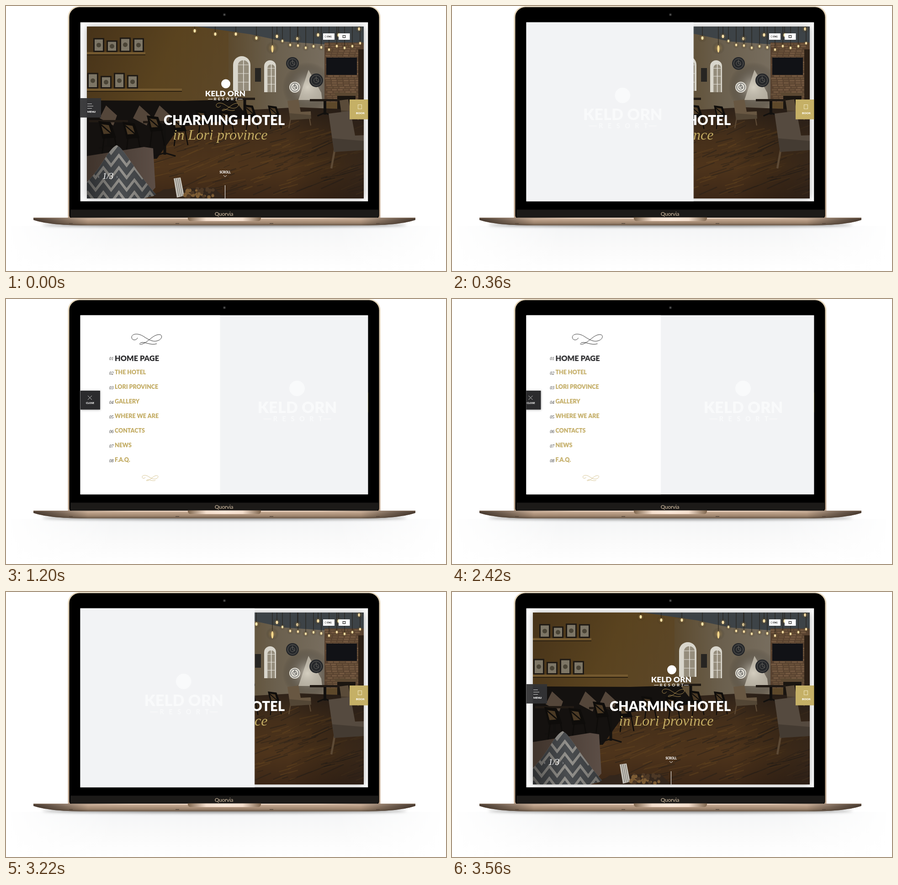
An HTML page with a canvas for the animation above (3.6 s loop, 963x581 px).

```html
<!DOCTYPE html>
<html lang="en">
<head>
<meta charset="utf-8">
<title>Resort menu</title>
<style>
html, body { margin: 0; width: 100%; height: 100%; overflow: hidden; background: #fff; }
canvas { display: block; width: 963px; height: 581px; }
</style>
</head>
<body>
<canvas id="stage" width="963" height="581"></canvas>
<script>
const W = 963, H = 581, LOOP = 3600;
const SCREEN = { x: 162.5, y: 35.5, w: 630, h: 393 };
const PHOTO = { x: 177, y: 45, w: 606, h: 377 };
const MENU_W = 306;
const SANS = 'Lato, sans-serif', SERIF = '"Liberation Serif", serif';
const GOLD = '#c2ab62', PALE = '#f2f3f5', DARK = '#2b2b2d', CLEAR = '#0000';
const stage = document.getElementById('stage').getContext('2d');
let c;

function layer(draw) {
  const el = document.createElement('canvas');
  el.width = W; el.height = H;
  c = el.getContext('2d');
  draw();
  return el;
}
function rect(color, x, y, w, h) { c.fillStyle = color; c.fillRect(x, y, w, h); }
function fill(color, box) { rect(color, box.x, box.y, box.w, box.h); }
function round(color, x, y, w, h, radii) {
  c.fillStyle = color;
  c.beginPath(); c.roundRect(x, y, w, h, radii); c.fill();
}
function poly(color, ...p) {
  c.fillStyle = color;
  c.beginPath();
  for (let i = 0; i < p.length; i += 2) c.lineTo(p[i], p[i + 1]);
  c.fill();
}
function line(color, width, ...p) {
  c.strokeStyle = color; c.lineWidth = width;
  c.beginPath();
  for (let i = 0; i < p.length; i += 2) c.lineTo(p[i], p[i + 1]);
  c.stroke();
}
function disc(color, x, y, r, ry = r) {
  c.fillStyle = color;
  c.beginPath(); c.ellipse(x, y, r, ry, 0, 0, 7); c.fill();
}
function ring(color, width, x, y, r) {
  c.strokeStyle = color; c.lineWidth = width;
  c.beginPath(); c.arc(x, y, r, 0, 7); c.stroke();
}
function fade(x0, y0, x1, y1, ...colors) {
  const g = c.createLinearGradient(x0, y0, x1, y1);
  colors.forEach((k, i) => g.addColorStop(i / (colors.length - 1), k));
  return g;
}
function glow(x, y, r, color) {
  const g = c.createRadialGradient(x, y, 0, x, y, r);
  g.addColorStop(0, color); g.addColorStop(1, CLEAR);
  rect(g, x - r, y - r, 2 * r, 2 * r);
}
function text(str, x, y, font, color, align = 'left', gap = 0) {
  c.font = font; c.fillStyle = color; c.textAlign = align;
  c.letterSpacing = gap + 'px';
  c.fillText(str, x, y);
}
function at(x, y, scale, draw) {
  c.save();
  c.translate(x, y); c.scale(scale, scale);
  draw();
  c.restore();
}
function clipTo(box, draw) {
  c.save();
  c.beginPath(); c.rect(box.x, box.y, box.w, box.h); c.clip();
  draw();
  c.restore();
}
function flourish(x, y, scale, color, width) {
  at(x, y, scale, () => {
    c.strokeStyle = color; c.lineWidth = width / scale;
    c.stroke(new Path2D('M13 9C10 16 0 15 0 8C0 0 14-2 26 6C38 14 46 18 55 16C68 13 69 1 59 2C47 3 39 15 27 21C18 26 15 23 20 20C27 16 42 27 55 22'));
  });
}
const bold = size => `900 ${size}px ${SANS}`;
const italic = size => `italic ${size}px ${SERIF}`;

function seeded(seed) {
  const next = () => (seed = (seed * 16807) % 2147483647) / 2147483647;
  return (lo = 0, hi = 1) => lo + next() * (hi - lo);
}

function laptop() {
  rect('#fff', 0, 0, W, H);
  rect(fade(0, 482, 0, H, '#f4f5f6', '#fafafa', '#fff'), 10, 482, 940, 99);
  rect(fade(0, 0, W, 0, '#fff', '#fff0', '#fff0', '#fff0', '#fff'), 0, 460, W, 121);
  c.filter = 'blur(3px)';
  disc('#444a', 478, 480, 398, 4);
  c.filter = 'none';

  round(fade(0, 0, 0, 465, '#e4d5ba', '#c9b59b', '#bfa68e'), 135.5, 0.5, 684, 470, [24, 24, 8, 8]);
  round('#000', 138.5, 2.5, 678, 463, [22, 22, 6, 6]);
  round('#1c1a18', 141, 446.5, 674, 18, [0, 0, 5, 5]);
  disc('#2b2b2b', 478, 19, 3);
  disc('#666', 478, 19, 1.2);
  text('Quorvia', 477, 459.5, `12px ${SANS}`, '#d8c3a8', 'center', -0.3);

  const base = new Path2D('M60 464H896V469C876 476 840 481 780 481H176C116 481 80 476 60 469Z');
  c.fillStyle = fade(0, 464, 0, 481, '#d9bea8', '#b89d86', '#a0866f', '#695848');
  c.fill(base);
  c.fillStyle = fade(60, 0, 896, 0, '#2a1f18cc', CLEAR, CLEAR, CLEAR, CLEAR, CLEAR, CLEAR, '#2a1f18cc');
  c.fill(base);
  rect(fade(60, 0, 896, 0, '#6d5948', '#e5cdb8', '#f4dfcf', '#e5cdb8', '#6d5948'), 60, 464, 836, 2);
  round(fade(398, 0, 558, 0, '#80674f', '#f5dfcd', '#fbe7d8', '#f5dfcd', '#80674f'), 398, 463.5, 160, 8, [0, 0, 6, 6]);
  for (const x of [142, 375, 581, 814]) rect('#59493c', x - 4, 476, 8, 1.5);
}

// Parts of the room
function arch(x, y, w, h) {
  round('#d9d6cc', x, y, w, h, [w / 2, w / 2, 0, 0]);
  round('#958d7c', x + w * .28, y + 9, w * .62, h - 9, [w * .3, w * .3, 0, 0]);
  line('#e5e2da', 1.5, x + w * .6, y + 8, x + w * .6, y + h);
  for (let k = 1; k < 4; k++) line('#e5e2da', 1, x + w * .28, y + h * k / 4, x + w * .9, y + h * k / 4);
}
function clock(x, y, r, face, mark) {
  disc(face, x, y, r);
  ring(mark, 1, x, y, r * .75);
  ring(mark, 1, x, y, r * .35);
  line(mark, 1, x, y - r * .6, x, y, x + r * .4, y + r * .2);
}
function shelf(x, y, length, rnd) {
  rect('#74592f', 177, y, length, 5);
  rect('#2a1f10', 177, y + 5, length, 2);
  for (; x < 285; x += 29) {
    const h = rnd(24, 36);
    rect('#1e1914', x, y - h, 24, h);
    rect('#7d7666', x + 3, y - h + 3, 18, h - 6);
    disc('#4a4436', x + 12, y - h / 2, 5);
  }
}
function darkChair(x, y, scale) {
  at(x, y, scale, () => {
    poly('#0e0c0a', 0, 0, 24, 3, 34, 32, 8, 34);
    poly('#4b3a25', 5, 6, 20, 8, 25, 24, 10, 25);
    line('#0e0c0a', 2.5, 5, 7, 26, 25);
    line('#0e0c0a', 2.5, 11, 32, 7, 65);
    line('#0e0c0a', 2.5, 31, 31, 37, 63);
  });
}
function armchair(x, y, scale, color) {
  at(x, y, scale, () => {
    line('#5d4a35', 2.2, 7, 38, 3, 60);
    line('#5d4a35', 2.2, 48, 37, 51, 54);
    poly(color, 0, 0, 24, -3, 29, 24, 51, 23, 52, 39, 6, 42);
    poly('#0003', 4, 27, 52, 31, 52, 39, 6, 42);
  });
}
function table(x, y, w, h) {
  rect('#211a14', x, y, w, 5);
  rect('#12100e', x + w / 2 - 3, y + 4, 6, h);
  line('#12100e', 3, x + w * .25, y + h + 7, x + w / 2, y + h, x + w * .75, y + h + 7);
}
function lights(x, step, y, sag, r, rnd) {
  const span = 783 - x;
  for (let d = 0; d < span; d += step) {
    const by = y + sag * Math.sin(Math.PI * d / span) + rnd(0, 8);
    line('#221c15', 1, x + d, 45, x + d, by);
    glow(x + d, by, r * 4, '#f1c36a88');
    disc('#ffe6ad', x + d, by, r, r * 1.5);
  }
}
function cushion() {
  c.save();
  c.clip(new Path2D('M242 305C258 312 278 355 330 415L300 422H177V386C210 355 222 315 242 305Z'));
  rect('#94928d', 177, 300, 160, 122);
  for (let y = 325; y < 470; y += 27) {
    c.beginPath();
    for (let i = 0; i < 12; i++) c.lineTo(162 + i * 17, y + (i % 2 ? -11 : 11));
    c.strokeStyle = '#4a4d50'; c.lineWidth = 11;
    c.stroke();
  }
  rect(fade(177, 0, 330, 0, '#0006', CLEAR, '#0004'), 177, 300, 160, 122);
  c.restore();
}

function room() {
  const rnd = seeded(71);
  fill(fade(177, 45, 520, 200, '#473319', '#5a431f', '#5d482a'), PHOTO);
  rect(fade(487, 0, 697, 0, '#5c4a2e', '#6b604e', '#776d5e'), 487, 58, 213, 185);
  poly('#3d4347', 418, 45, 783, 45, 783, 80, 698, 84, 610, 78, 535, 62);
  glow(660, 178, 55, '#e6e0d4cc');
  poly('#d8d2c4aa', 662, 140, 690, 190, 692, 206, 640, 206);
  arch(497, 110, 38, 76);
  arch(565, 119, 26, 70);
  rect('#272522', 545, 136, 13, 30);
  clock(627, 126, 14, '#25272a', '#66645f');
  clock(679, 163, 15, '#25272a', '#66645f');
  clock(632, 178, 12, '#dedbd2', '#333');

  // Brick column with screen and fireplace
  rect('#57412f', 697, 80, 86, 130);
  for (let y = 82; y < 208; y += 5)
    for (let x = 697 + rnd(0, 8); x < 768; x += 13)
      rect(rnd() < .5 ? '#735840' : '#685039', x, y, 11, 3.5);
  rect('#2b1f15', 771, 95, 12, 116);
  rect('#111216', 701, 113, 67, 38);
  rect('#5b4832', 720, 190, 50, 7);
  rect('#1a1510', 725, 197, 40, 45);

  // Floor boards
  poly(fade(0, 215, 0, 422, '#2c2119', '#452f1a', '#4e341b', '#3c2717'),
    177, 300, 400, 235, 640, 222, 783, 228, 783, 422, 177, 422);
  for (let i = 0; i < 190; i++) {
    const x = rnd(300, 780), y = rnd(275, 422), len = rnd(12, 57);
    line(rnd() < .5 ? '#61431e88' : '#28201988', rnd(.8, 2.8), x, y, x + len, y - len * rnd(.2, .5));
  }
  rect(fade(620, 0, 783, 0, CLEAR, '#1d181777'), 620, 225, 163, 197);

  // Left wall
  poly('#14110f', 177, 207, 390, 208, 500, 205, 530, 245, 380, 265, 330, 335, 177, 335);
  shelf(191, 101, 128, rnd);
  shelf(178, 181, 208, rnd);

  // Seating
  for (const x of [205, 278, 322]) poly('#54463a', x, 246, x + 14, 218, x + 38, 240, x + 30, 262);
  table(182, 250, 85, 55);
  table(300, 252, 95, 70);
  table(500, 201, 45, 34);
  for (let i = 0; i < 8; i++) darkChair(202 + i * 53, 252 - i * 6 + (i % 2) * 8, 1.15 - i * .05);
  armchair(616, 208, 1, '#685742');
  table(665, 204, 66, 30);
  armchair(730, 207, .8, '#5a4b39');
  armchair(706, 236, 2, '#554a3f');

  // Foreground
  poly(fade(177, 0, 326, 0, '#40342c', '#5c4e46'), 177, 329, 302, 309, 322, 312, 327, 398, 305, 422, 177, 422);
  cushion();
  poly('#33261c', 315, 422, 345, 402, 455, 398, 480, 422);
  poly('#c6c3bb', 367, 378, 382, 376, 390, 416, 374, 420);
  for (let x = 371; x < 381; x += 4) line('#625f59', 1, x, 378, x + 7, 417);
  for (let i = 0; i < 40; i++)
    disc(rnd() < .5 ? '#7d5c34' : '#4d3825', rnd(391, 455), rnd(399, 419), rnd(2, 5));

  lights(413, 45, 48, 18, 2.4, rnd);
  lights(605, 17, 74, 15, 1.9, rnd);
  line('#221c15', 1, 583, 45, 583, 92);
  glow(583, 92, 14, '#f1c36a88');
  disc('#ffd98c', 583, 94, 2.3, 8);
}

function brand(x, y, size, color, small, gap, dash) {
  text('KELD ORN', x, y, bold(size), color, 'center');
  const ty = y + size * .52, w = small * 3.65 + gap * 5;
  text('RESORT', x - w / 2, ty, `700 ${small}px ${SANS}`, color, 'left', gap);
  const ly = ty - small * .34, half = w / 2 + dash * .25;
  for (const s of [-1, 1]) line(color, small / 9, x + s * half, ly, x + s * (half + dash), ly);
}

function home() {
  fill('#fff', SCREEN);
  clipTo(SCREEN, () => {
    c.shadowColor = '#6668'; c.shadowBlur = 14;
    fill('#453420', PHOTO);
  });
  clipTo(PHOTO, room);

  rect('#333335f2', 163, 202, 45, 42.5);
  for (let i = 0; i < 3; i++) line('#ccc', 1, 178, 214.5 + 5 * i, 188 + 3 * (i % 2), 214.5 + 5 * i);
  text('MENU', 178, 234, bold(6), '#fff');
  rect('#c5b066', 752, 205, 41, 43.5);
  c.strokeStyle = '#eee3bb'; c.lineWidth = 1;
  c.strokeRect(770.5, 216.5, 8, 9);
  text('BOOK', 766, 237, bold(6.3), '#fff');

  rect('#fff', 694, 60, 25, 14);
  rect('#fff', 728, 60, 24.5, 14);
  ring('#777', .8, 699.5, 67, 2);
  text('ENG', 703, 69, bold(4.6), '#333');
  ring('#333', 1, 740, 67, 3);
  for (const y of [65, 69]) line('#333', 1, 736, y, 744, y);

  disc('#fff', 481, 170.5, 10);
  brand(480, 198, 17.5, '#fff', 8.4, 4, 10);
  flourish(460, 212, .74, '#a88b4f', 1);
  text('CHARMING HOTEL', 477.5, 261, bold(29.2), '#fff', 'center');
  text('in Lori province', 469, 293, italic(32), GOLD, 'center');

  text('1/3', 211, 379, italic(19), '#fff');
  line('#aaa', 1, 204, 373, 202, 375, 204, 377);
  line('#aaa', 1, 242, 373, 244, 375, 242, 377);
  text('SCROLL', 479.5, 367, bold(6.5), '#fff', 'center');
  line('#fff', 1, 476, 371, 479.5, 374.5, 483, 371);
  line('#fff', 1, 479.5, 393, 479.5, 422);
}

function cover() {
  fill(PALE, SCREEN);
  disc('#f9fafb', 637, 196, 17);
  brand(637.5, 250, 34.4, '#f9fafb', 14.5, 10.5, 17);
}

const ITEMS = ['HOME PAGE', 'THE HOTEL', 'LORI PROVINCE', 'GALLERY', 'WHERE WE ARE', 'CONTACTS', 'NEWS', 'F.A.Q.'];

function menu() {
  rect('#fff', SCREEN.x, SCREEN.y, MENU_W, SCREEN.h);
  flourish(275, 76, 1, '#333', 1);
  ITEMS.forEach((label, i) => {
    const y = i ? 133.3 + 32 * i : 136;
    text('0' + (i + 1), 226, y + (i ? 1 : -2), italic(9.3), '#333');
    text(label, 238, y, bold(i ? 12.5 : 16.4), i ? GOLD : DARK);
  });
  flourish(298, 386, .53, '#d3c08b', .9);
  c.shadowColor = '#0005'; c.shadowBlur = 5;
  rect(DARK, 163, 201, 43, 41.5);
  c.shadowColor = CLEAR;
  line('#ccc', 1, 179, 212, 188, 221);
  line('#ccc', 1, 188, 212, 179, 221);
  text('CLOSE', 184, 230, bold(5.8), '#fff', 'center');
}

const layers = { laptop: layer(laptop), home: layer(home), cover: layer(cover), menu: layer(menu) };

const ramp = (t, start, length) => Math.min(1, Math.max(0, (t - start) / length));
const ease = u => u < .5 ? 4 * u ** 3 : 1 - 4 * (1 - u) ** 3;

function render(t) {
  const covered = ease(ramp(t, 20, 643)) - ease(ramp(t, 2923, 643));
  const opened = ramp(t, 669, 531) - ramp(t, 2400, 531);
  c = stage;
  c.drawImage(layers.laptop, 0, 0);
  clipTo(SCREEN, () => {
    c.drawImage(layers.home, 0, 0);
    if (covered > 0) c.drawImage(layers.cover, (covered - 1) * SCREEN.w, 0);
    if (opened > 0) c.drawImage(layers.menu, (opened - 1) * MENU_W, 0);
  });
}

const began = performance.now();
function tick() {
  const t = (performance.now() - began) % LOOP;
  render(Math.floor(t / 20) * 20);
  requestAnimationFrame(tick);
}
tick();
</script>
</body>
</html>
```
